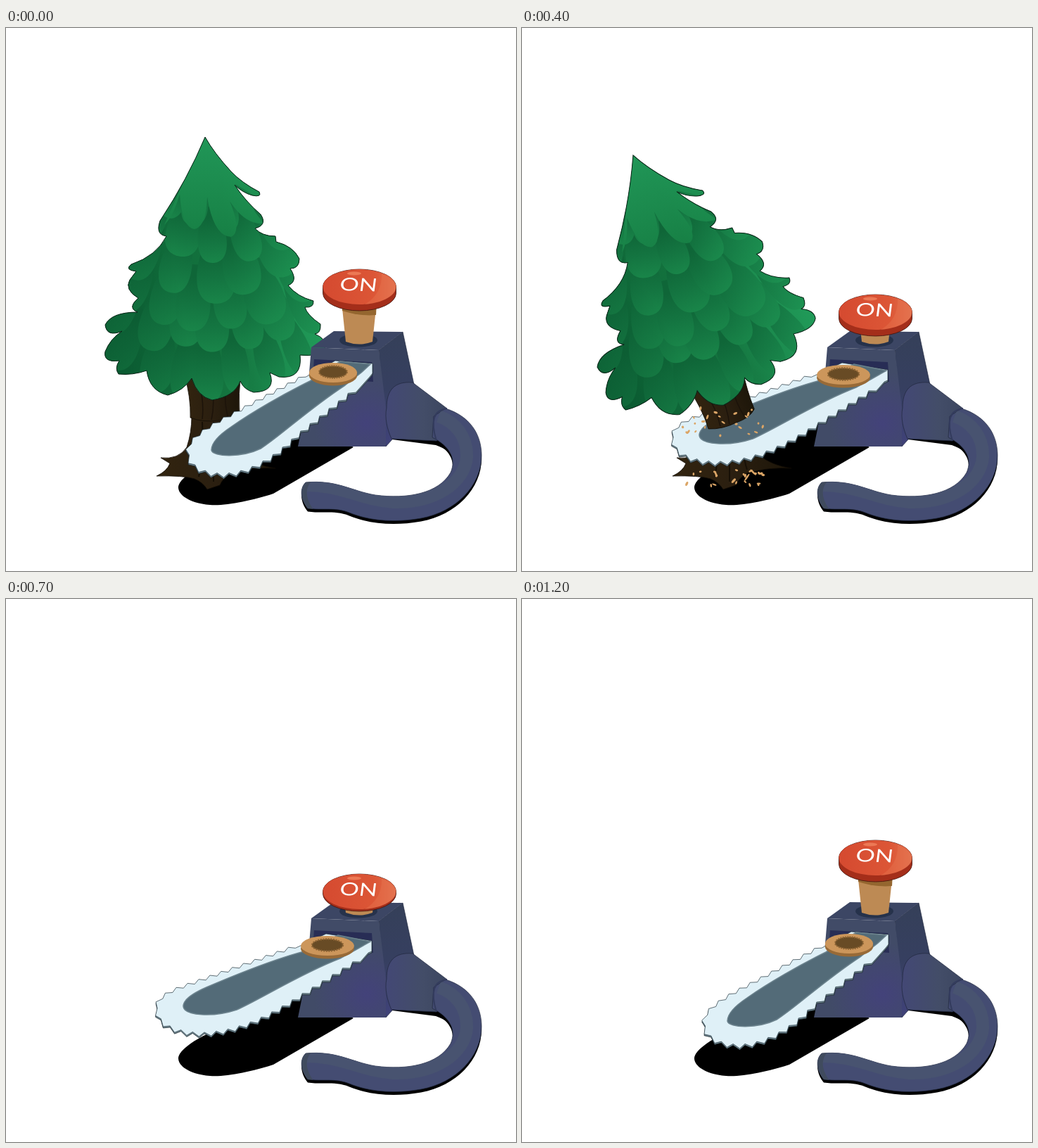
An HTML page that plays this animation: 725x772 px, repeating every 1300 ms.

```html
<!DOCTYPE html>
<html lang="en">
<head>
<meta charset="utf-8">
<title>Chainsaw button</title>
<style>
html, body { margin: 0; width: 100%; height: 100%; overflow: hidden; background: #fff; }
svg { display: block; width: 725px; height: 772px; }
</style>
</head>
<body>
<svg viewBox="0 0 725 772">
  <defs>
    <linearGradient id="leafShade" x1="0" y1="0" x2="0" y2="1">
      <stop offset=".2" stop-color="#0f6638"/><stop offset=".62" stop-color="#147541"/><stop offset="1" stop-color="#198549"/>
    </linearGradient>
    <linearGradient id="foliageShade" x1="0" y1="0" x2="1" y2="0">
      <stop offset="0" stop-color="#0d6436"/><stop offset=".55" stop-color="#14743f"/><stop offset="1" stop-color="#1f9555"/>
    </linearGradient>
    <linearGradient id="sideLight" x1="0" y1=".7" x2="1" y2=".5">
      <stop offset="0" stop-color="#07502c" stop-opacity=".6"/><stop offset=".35" stop-color="#07502c" stop-opacity="0"/>
      <stop offset=".6" stop-color="#22a05c" stop-opacity="0"/><stop offset="1" stop-color="#22a05c" stop-opacity=".55"/>
    </linearGradient>
    <linearGradient id="crownShade" x1="0" y1="0" x2="0" y2="1">
      <stop offset="0" stop-color="#219758"/><stop offset="1" stop-color="#178045"/>
    </linearGradient>
    <linearGradient id="trunkShade" x1="0" y1="0" x2="1" y2="0">
      <stop offset="0" stop-color="#32240f"/><stop offset=".5" stop-color="#2b1f10"/><stop offset="1" stop-color="#1d1609"/>
    </linearGradient>
    <radialGradient id="frontShade" gradientUnits="userSpaceOnUse" cx="512" cy="562" r="75">
      <stop offset="0" stop-color="#43427a"/><stop offset="1" stop-color="#414b67"/>
    </radialGradient>
    <linearGradient id="rightShade" x1="0" y1="0" x2="0" y2="1">
      <stop offset="0" stop-color="#354059"/><stop offset=".5" stop-color="#363f60"/><stop offset="1" stop-color="#40427a"/>
    </linearGradient>
    <linearGradient id="motorShade" x1="0" y1="0" x2="1" y2="0">
      <stop offset="0" stop-color="#434875"/><stop offset=".6" stop-color="#434d68"/><stop offset="1" stop-color="#3c4660"/>
    </linearGradient>
    <linearGradient id="capShade" x1="0" y1="0" x2="1" y2="0">
      <stop offset="0" stop-color="#d54a30"/><stop offset=".7" stop-color="#dc5636"/><stop offset="1" stop-color="#e2704d"/>
    </linearGradient>
    <path id="handle" d="M426 646C470 642 490 658 525 664C570 670 615 662 632 632C641 612 630 594 606 582L608 552L625 541C660 552 676 578 676 608C676 650 640 688 590 697C550 704 515 700 488 689C468 681 450 686 429 683C420 672 416 656 426 646Z"/>
    <clipPath id="handleClip"><use href="#handle"/></clipPath>
    <clipPath id="foliageClip"><path id="foliageMask"/></clipPath>
    <clipPath id="outsideBody"><path d="M0 0H725V431H466L434 454L431 490L415 595L400 772H0Z"/></clipPath>
    <g id="tree">
      <path d="M253 490H334Q330 520 332 548Q322 558 302 558Q280 561 262 554Q263 525 253 490Z" fill="url(#trunkShade)" stroke="#120d05" stroke-width=".8"/>
      <path d="M274 505Q282 530 279 556M293 510Q297 535 292 557M313 505Q309 530 316 555" fill="none" stroke="#1c130a" stroke-width="1.500"/>
      <path id="foliage" fill="url(#foliageShade)"/>
      <g id="leaves" clip-path="url(#foliageClip)"></g>
      <path id="foliageEdge" fill="url(#sideLight)" stroke="#0b2417" stroke-width="1"/>
    </g>
  </defs>

  <path d="M245 652C247 640 270 625 300 612L416 555L494 596L380 662C350 672 310 680 290 678C262 676 244 664 245 652Z"/>
  <use href="#handle" transform="translate(0 4.500)"/>
  <path d="M545 578L549 585L611 593Q632 600 637 616L643 606L618 578Z"/>

  <g id="stump">
    <path d="M264 552H331Q328 585 337 607Q355 622 383 626Q350 624 320 633Q308 640 304 650L286 656Q280 646 268 641Q252 636 214 637Q229 630 233 619L220 611Q245 614 257 596Q264 575 264 552Z" fill="url(#trunkShade)" stroke="#100b04" stroke-width=".8"/>
    <path d="M279 560Q281 605 274 638M295 560V645M314 560Q312 605 320 628" fill="none" stroke="#171006" stroke-width="2"/>
  </g>
  <use id="treeBehind" href="#tree"/>

  <g stroke="#20283d" stroke-width=".7">
    <path d="M530 458L564 432L580 507L549 585L540 595Z" fill="url(#rightShade)"/>
    <path d="M434 454L466 431L564 432L530 458Z" fill="#3c4664" stroke="none"/>
    <path d="M434 454L530 458L540 540V595H415Q426 545 431 490Z" fill="url(#frontShade)" stroke="none"/>
    <path d="M541 540C541 515 552 502 578 504L627 541C612 545 606 560 612 587L548 584C542 570 538 555 541 540Z" fill="url(#motorShade)"/>
    <use href="#handle" fill="#444c72"/>
  </g>
  <g clip-path="url(#handleClip)" fill="none">
    <path d="M420 650C475 648 500 670 550 674C610 676 652 646 655 610C656 580 638 560 615 552" stroke="#485370" stroke-width="18"/>
    <path d="M430 640Q412 660 432 688" stroke="#404b5e" stroke-width="12"/>
  </g>
  <path d="M627 541C608 543 603 558 612 587" fill="none" stroke="#333b5d" stroke-width="2"/>

  <path d="M438 471L520 475L522 503L436 497Z" fill="#282d55"/>
  <path id="bladeSide" fill="#788f9a" stroke="#1b272d" stroke-width=".8" transform="translate(0 2)"/>
  <path id="bladeTop" fill="#dff0f7" stroke="#22333b" stroke-width=".7"/>
  <path id="bladeCore" fill="#536b78" stroke="#6b828d" stroke-width="1.500"/>

  <g clip-path="url(#outsideBody)"><use id="treeFront" href="#tree"/></g>
  <g id="chips" fill="#dba566"></g>

  <g id="ring">
    <ellipse cy="4" rx="38" ry="14.500" fill="#986a37"/>
    <ellipse rx="38" ry="14" fill="#cc965b"/>
    <ellipse cy="-1" rx="22" ry="8.500" fill="#684b25"/>
    <ellipse cy="-1" rx="22" ry="8.500" fill="none" stroke="#8a6233" stroke-width="2.500" stroke-dasharray="2 1.600"/>
  </g>

  <ellipse cx="501" cy="444" rx="27" ry="9.500" fill="#26324b"/>
  <path id="stem" fill="#bd8a54"/>
  <path id="stemShade" fill="#94662f"/>
  <g id="cap">
    <path id="capSide" fill="#a42e1a" stroke="#40140d" stroke-width=".8"/>
    <ellipse cx="502.500" cy="368" rx="52" ry="25" fill="url(#capShade)"/>
    <path d="M534 349Q560 362 551 377Q536 391 510 393Q535 378 534 349Z" fill="#e57650" opacity=".4"/>
    <ellipse cx="495" cy="349" rx="10" ry="2.500" fill="#ec7955"/>
    <text transform="matrix(1 .03 -.1 .75 473.500 373)" font-family="Lato, Open Sans, sans-serif" font-size="34" fill="#fff">ON</text>
  </g>
</svg>
<script>
const STEP = 100, STEPS = 13;
const $ = id => document.getElementById(id);
const set = (id, name, value) => $(id).setAttribute(name, value);
const show = (id, on) => set(id, 'visibility', on ? 'visible' : 'hidden');
const lerp = (a, b, k) => a + (b - a) * k;

function add(parent, tag, attrs) {
  const el = document.createElementNS('http://www.w3.org/2000/svg', tag);
  for (const name in attrs) el.setAttribute(name, attrs[name]);
  $(parent).appendChild(el);
}

function seeded(seed) {
  return () => (seed = (seed * 16807) % 2147483647) / 2147483647;
}

// Blend two paths that share the same commands.
function blend(from, to, k) {
  const ends = to.match(/[\d.]+/g);
  let i = 0;
  return from.replace(/[\d.]+/g, n => lerp(+n, +ends[i++], k).toFixed(1));
}

const rightEdge = 'M283 155Q296 178 320 204Q335 220 360 233Q364 241 350 238Q336 234 325 223Q340 246 362 265Q372 280 354 285Q364 296 383 296L384 304Q408 310 417 328Q417 342 404 342Q416 360 401 366Q414 382 437 388Q438 398 425 397Q428 408 447 421Q448 434 439 435Q456 442 454 454Q446 468 418 465';
const leftEdge = 'Q422 500 388 496L375 490Q385 517 352 518Q338 514 333 502Q325 524 293 529Q272 524 264 498Q252 516 230 522Q204 516 200 487Q180 494 160 492Q154 484 161 473Q138 476 141 460Q148 442 165 431Q143 440 141 422Q150 404 187 404Q172 398 188 384Q168 372 176 358L185 346Q168 344 178 336Q214 324 228 296Q212 294 219 274Q258 215 283 155Z';

function growTree() {
  for (const id of ['foliage', 'foliageMask', 'foliageEdge']) set(id, 'd', rightEdge + leftEdge);
  const random = seeded(41);
  // tip height, left, right, leaves, length, sag
  const rows = [
    [488, 160, 425, 7, 95, 38], [442, 155, 438, 7, 95, 25], [392, 160, 430, 6, 95, 30],
    [352, 185, 405, 5, 90, 34], [300, 200, 400, 5, 80, 30], [268, 228, 358, 4, 75, 22]
  ];
  for (const [y, left, right, count, length, sag] of rows) {
    for (let i = 0; i < count; i++) {
      const u = i / (count - 1) * 2 - 1;
      const x = lerp(left, right, (u + 1) / 2) + random() * 14 - 7;
      const tip = y + sag * (1 - u * u) + random() * 26 - 13;
      const w = (right - left) / count * (.6 + random() * .2);
      const turn = Math.atan2(283 - x, tip - 130) * 180 / Math.PI;
      add('leaves', 'path', {
        d: `M0 0C${-w} 0 ${-w} ${-length / 2} ${-w / 3} ${-length}H${w / 3}C${w} ${-length / 2} ${w} 0 0 0Z`,
        transform: `translate(${x} ${tip}) rotate(${turn})`,
        fill: 'url(#leafShade)'
      });
    }
  }
  add('leaves', 'path', {
    d: 'M283 150L225 280Q238 268 247 236Q250 284 268 286Q285 282 286 240Q295 296 320 297Q336 290 318 246Q340 280 366 278L326 222L365 245V225L320 195Z',
    fill: 'url(#crownShade)'
  });
}

const bladeUp = 'M468 473L428 494L300 562C275 577 261 588 259 600C258 622 280 634 310 634C350 632 385 607 413 579L517 496L521 491L521 477Z';
const bladeDown = 'M455 476L415 494L250 553C225 562 214 572 214 582C214 602 238 616 275 617C325 617 370 595 413 567L515 503L520 501L520 486Z';
const coreUp = 'M475 474L432 502C395 520 350 546 320 567C302 579 292 590 292 600C294 610 335 611 362 598C390 580 430 542 482 508L505 490L518 478Z';
const coreDown = 'M472 478L432 499C385 510 320 537 285 552C262 562 252 571 252 579C253 593 295 595 328 584C360 570 420 532 475 511L495 500L518 487Z';

function drawBlade(k) {
  const path = $('bladeTop');
  path.setAttribute('d', blend(bladeUp, bladeDown, k));
  const start = 48, end = path.getTotalLength() - 95;
  const count = Math.round((end - start) / 17);
  const pitch = (end - start) / count;
  const offset = (s, height) => {
    const p = path.getPointAtLength(s), q = path.getPointAtLength(s + 1);
    return `L${(p.x - (q.y - p.y) * height).toFixed(1)} ${(p.y + (q.x - p.x) * height).toFixed(1)}`;
  };
  const [x0, x1, y0] = [lerp(468, 455, k), lerp(521, 520, k), lerp(473, 476, k)];
  let d = `M${x0} ${y0}`;
  for (let i = 0; i < count; i++) {
    const s = start + i * pitch;
    d += offset(s, -1) + offset(s + pitch * .55, i / count < .4 ? 3.5 : 5);
  }
  d += `L${lerp(517, 515, k)} ${lerp(496, 503, k)}L${x1} ${lerp(491, 501, k)}V${lerp(477, 486, k)}Z`;
  set('bladeTop', 'd', d);
  set('bladeSide', 'd', d);
  set('bladeCore', 'd', blend(coreUp, coreDown, k));
  set('ring', 'transform', `translate(${lerp(465, 457, k)} ${lerp(490, 493, k)}) scale(${lerp(.9, 1, k)} 1)`);
}

function drawButton(press) {
  const depth = press > 40 ? 3 : 9, top = 343 + press, y = top + 46;
  set('cap', 'transform', `translate(0 ${press})`);
  set('capSide', 'd', `M450.5 368A52 25 0 0 1 554.5 368V${368 + depth}A52 25 0 0 1 450.5 ${368 + depth}Z`);
  const half = lerp(25, 20, press / 48);
  set('stem', 'd', `M${502 - half} ${y}H${502 + half}L521 446Q502 453 483 446Z`);
  const shade = Math.max(0, 19 - press * .55);
  set('stemShade', 'd', `M${502 - half} ${y}H${502 + half}L${501 + half} ${y + shade}Q502 ${y + shade + 2} ${503 - half} ${y + shade - 6}Z`);
}

function drawChips(step) {
  $('chips').replaceChildren();
  const count = [0, 6, 12, 20, 48, 18, 12][step] || 0;
  const random = seeded(97 + step * 131);
  const settled = step >= 5, size = step === 4 ? 2.4 : 3.3;
  for (let i = 0; i < count; i++) {
    const low = i % 2, spread = settled && !low ? 52 : 115;
    const x = (settled && !low ? 264 : 228) + random() * spread;
    const y = low ? 628 + random() * 25 : settled ? 567 + random() * 16 : 540 + random() * 40;
    const rx = size * (.6 + random() * (low && i % 5 === 0 ? 2 : .8));
    add('chips', 'ellipse', {
      rx, ry: size * (.45 + random() * .3),
      transform: `translate(${x} ${y}) rotate(${settled ? -20 + random() * 25 : random() * 180 - 90})`
    });
  }
}

const bladeTravel = step => Math.min(1, step / 3, (12 - step) / 3);
const pressTravel = step => {
  const n = Math.min(step, 12 - step, 5);
  return step > 5 && step < 8 ? 48 : n <= 3 ? n * 25 / 3 : n === 4 ? 36 : 48;
};
const fall = {
  4: 'translate(300.5 564.5) rotate(-18.4) scale(1.01) translate(-297 -560)',
  5: 'translate(297.5 559) rotate(-40.2) scale(1.016) translate(-297 -560)'
};

let shown = -1;
function draw(time) {
  const step = Math.floor(time / STEP) % STEPS;
  if (step !== shown) {
    shown = step;
    drawBlade(bladeTravel(step));
    drawButton(pressTravel(step));
    drawChips(step);
    show('stump', step < 7);
    show('treeBehind', step < 2);
    show('treeFront', step > 1 && step < 6);
    set('treeFront', 'transform', fall[step] || '');
  }
}

growTree();
draw(0);
const began = performance.now();
(function tick() {
  draw(performance.now() - began);
  requestAnimationFrame(tick);
})();
</script>
</body>
</html>
```
